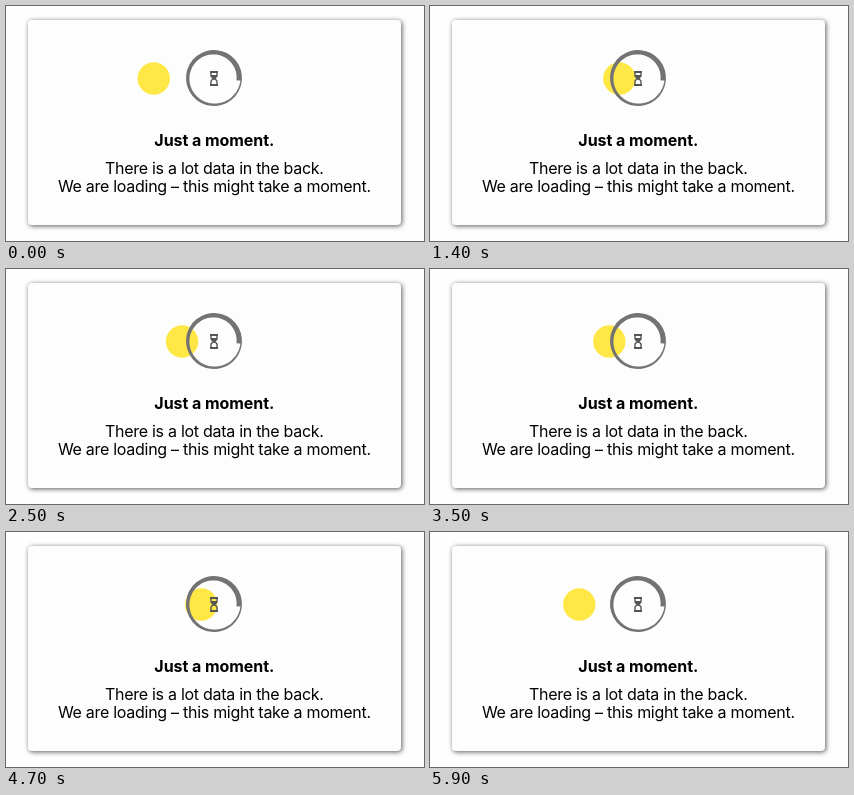
An HTML page with a canvas for the animation above (6000 ms loop, 418 px wide and 235 px high).

```html
<!DOCTYPE html>
<html lang="en">
<head>
<meta charset="utf-8">
<title>Just a moment</title>
<style>
  html, body { margin: 0; width: 100%; height: 100%; overflow: hidden; background: #fefefe; }
  .card {
    position: absolute; left: 22px; top: 14px; width: 373px; height: 205px;
    background: #fefdfe; border-radius: 4px;
    box-shadow: 1px 1px 5px rgba(0, 0, 0, .65);
  }
  canvas, svg { position: absolute; left: 0; top: 0; width: 418px; height: 235px; }
  text {
    font: 16px Inter, "Liberation Sans", sans-serif;
    letter-spacing: -.28px; text-anchor: middle; fill: #000;
  }
  .title { font-weight: 700; letter-spacing: -.06px; }
</style>
</head>
<body>
<div class="card"></div>
<canvas></canvas>
<svg viewBox="0 0 418 235">
  <text class="title" x="208.3" y="140">Just a moment.</text>
  <text x="208.3" y="168">There is a lot data in the back.</text>
  <text x="208.3" y="186">We are loading – this might take a moment.</text>
</svg>
<script>
const LOOP = 6000, STEP = 100, SWING = 1000, LAG = 16;
const TAU = Math.PI * 2;
const canvas = document.querySelector('canvas');
const ctx = canvas.getContext('2d');
const scale = window.devicePixelRatio || 1;
canvas.width = 418 * scale;
canvas.height = 235 * scale;
ctx.scale(scale, scale);

// cubic-bezier(.42, 0, .58, 1), solved for its parameter by bisection
function easeInOut(x) {
  let lo = 0, hi = 1;
  for (let i = 0; i < 24; i++) {
    const s = (lo + hi) / 2, r = 1 - s;
    const bx = 3 * r * r * s * .42 + 3 * r * s * s * .58 + s * s * s;
    if (bx < x) lo = s; else hi = s;
  }
  return lo * lo * (3 - 2 * lo);
}

function ballX(time) {
  const phase = ((time - LAG + LOOP) % (2 * SWING)) / SWING;
  return 147.7 + 60 * easeInOut(phase < 1 ? phase : 2 - phase);
}

// Ring whose stroke grows clockwise, ending in a blunt step at the right
function ringPath(cx, cy, radius, thin, thick, start) {
  const path = new Path2D();
  path.arc(cx, cy, radius, start, start + TAU);
  for (let i = 120; i >= 0; i--) {
    const u = i / 120, a = start + u * TAU;
    const r = radius - thin - (thick - thin) * u;
    path.lineTo(cx + r * Math.cos(a), cy + r * Math.sin(a));
  }
  path.closePath();
  return path;
}

const ring = ringPath(208, 72, 28, 1.5, 5.5, .1);
const glass = new Path2D('M205 66V70L207.2 72.5L205 75V79H211V75L208.8 72.5L211 70V66');
const sand = new Path2D('M205 69H211V70L208.8 72.5V74H207.2V72.5L205 70Z');

function drawHourglass() {
  ctx.fillStyle = ctx.strokeStyle = '#555';
  ctx.lineWidth = 1.4;
  ctx.stroke(glass);
  ctx.fill(sand);
  ctx.fillRect(204, 65, 8, 2);
  ctx.fillRect(204, 78, 8, 2);
}

function render(now) {
  const time = Math.floor((now % LOOP) / STEP) * STEP;
  ctx.clearRect(0, 0, 418, 235);
  ctx.fillStyle = '#ffe846';
  ctx.beginPath();
  ctx.arc(ballX(time), 72.5, 16.2, 0, TAU);
  ctx.fill();
  ctx.fillStyle = '#737373';
  ctx.fill(ring);
  drawHourglass();
}

const begin = performance.now();
function tick() {
  render(performance.now() - begin);
  requestAnimationFrame(tick);
}
tick();
</script>
</body>
</html>
```
